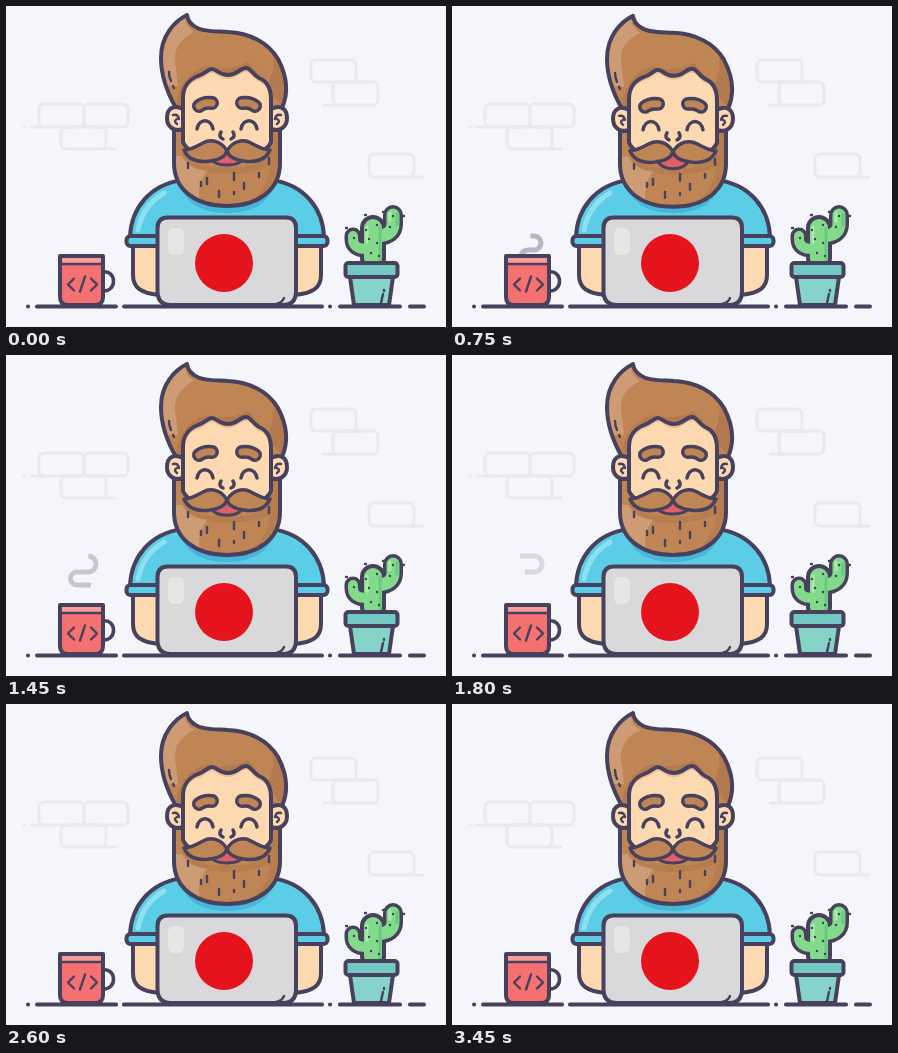
Recreate the animation shown at these times as an HTML page. Size 440x321 px, loop 3.5 s.

```html
<!DOCTYPE html>
<html lang="en">
<head>
<meta charset="utf-8">
<title>Bearded developer at a laptop</title>
<style>
  html, body { margin: 0; width: 100%; height: 100%; overflow: hidden; background: #f5f6fb; }
  svg { display: block; width: 440px; height: 321px; }
  .line { stroke: #47415d; stroke-width: 4; stroke-linecap: round; stroke-linejoin: round; }
  .thin { stroke-width: 2.4; }
  .open { fill: none; }
  .skin { fill: #fcd9b0; }
  .hair { fill: #bf8555; }
  .shade { fill: #a9714a; }
  .glow { fill: #cd9c74; }
  .shirt { fill: #5bcde6; }
  .green { fill: #83da8a; }
  .bricks { fill: none; stroke: #ebeaeb; stroke-width: 3; stroke-linecap: round; }
</style>
</head>
<body>
<svg viewBox="0 0 440 321">
  <defs>
    <path id="hairShape" d="M181 9C169 15 155 29 155 52C155 72 162 88 170 102H276C283 86 281 70 272 53C262 36 243 27 222 26C210 25 196 26 188 20Q182 16 181 9Z"/>
    <path id="face" d="M177 150V92C177 80 184 73 192 70C199 68 202 63 206 63C211 63 212 69 222 69C231 69 234 62 240 62C245 62 247 69 253 72C261 75 265 82 265 94V150Z"/>
    <path id="beardShape" d="M168 124V157C168 184 190 200 221 200C252 200 274 184 274 157V124H265V136Q260 147 243 148H199Q182 147 177 136V124Z"/>
    <path id="shirtShape" d="M124 231C125 203 143 179 176 174H266C299 179 317 203 318 231Z"/>
    <path id="mustache" d="M221 145C215 134 204 133 197 137C190 141 184 144 178 144C182 154 193 157 204 155C213 154 219 151 221 145Z"/>
    <clipPath id="hairClip"><use href="#hairShape"/></clipPath>
    <clipPath id="beardClip"><use href="#beardShape"/></clipPath>
    <clipPath id="shirtClip"><use href="#shirtShape"/></clipPath>
    <g id="ear">
      <path class="line skin" d="M177 103C167 98 161 103 161 112C161 121 168 126 177 123Z"/>
      <path class="line thin open" d="M167 109Q172 108 173 113M171 113Q167 115 171 118"/>
    </g>
    <g id="faceHalf">
      <path class="line open" d="M193 100Q198 96 206 97" style="stroke-width:14"/>
      <path d="M193 100Q198 96 206 97" fill="none" stroke="#bf8555" stroke-width="7" stroke-linecap="round"/>
      <path class="line open" d="M191 123C193 112 205 112 207 123" style="stroke-width:3.5"/>
      <path class="line open" d="M215 126Q212 131 217 133" style="stroke-width:3.5"/>
    </g>
    <g id="arm">
      <path class="line skin" d="M127 240V269C127 282 135 287 153 289V240Z"/>
      <rect class="line shirt" x="120.500" y="230" width="36" height="10" rx="4"/>
    </g>
  </defs>

  <g class="bricks">
    <rect x="33" y="98" width="45" height="23" rx="5"/>
    <rect x="78" y="98" width="44" height="23" rx="5"/>
    <rect x="55" y="121" width="45" height="22" rx="5"/>
    <rect x="305" y="54" width="45" height="22" rx="5"/>
    <rect x="327" y="76" width="45" height="23" rx="5"/>
    <rect x="363" y="148" width="45" height="23" rx="5"/>
    <path d="M18 121h.1M25 121H40M95 143H109M318 99H332M345 76H360M403 171H417"/>
  </g>

  <path class="line open" d="M22 300.500h.1M31 300.500H110M118 300.500H316M324 300.500h.1M334 300.500H394M404 300.500H418"/>

  <!-- Body -->
  <use href="#shirtShape" class="shirt"/>
  <g clip-path="url(#shirtClip)">
    <path d="M172 174Q180 207 221 207Q262 207 270 174Z" fill="#48b5da"/>
    <path d="M132 224Q137 199 158 187" fill="none" stroke="#8de0ef" stroke-width="5" stroke-linecap="round"/>
  </g>
  <use href="#shirtShape" class="line open"/>
  <use href="#arm"/>
  <use href="#arm" transform="translate(442) scale(-1 1)"/>

  <!-- Head -->
  <g id="head">
    <use href="#hairShape" class="hair"/>
    <g clip-path="url(#hairClip)">
      <path class="glow" d="M181 9Q176 18 188 26Q164 38 170 62L172 80H150V20Z"/>
      <path class="shade" opacity=".5" d="M260 30Q275 55 260 82L285 110V30ZM170 100Q172 70 200 60Q222 66 242 56L262 80V102Z"/>
    </g>
    <use href="#hairShape" class="line open"/>
    <path class="line open thin" d="M163 66Q163 71 165 75M167 80l1 2"/>
    <use href="#face" fill="#edbd94"/>
    <use href="#face" class="skin" y="4"/>
    <use href="#face" class="line open"/>
    <use href="#beardShape" class="hair"/>
    <g clip-path="url(#beardClip)">
      <path class="glow" d="M168 150H176Q184 165 202 164Q190 178 194 198H168Z"/>
      <path class="shade" opacity=".4" d="M177 136Q180 159 204 161H238Q260 159 265 136V124H276V200H235Q262 188 264 160Q245 168 221 168Q190 168 177 150Z"/>
    </g>
    <use href="#beardShape" class="line open"/>
    <path class="line open thin" d="M182 157v5M195 176v4M201 172v6M213 185v6M228 167v7M228 186v2M238 177v6M253 167v4M263 152v6"/>
    <use href="#ear"/>
    <use href="#ear" transform="translate(442) scale(-1 1)"/>
    <use href="#faceHalf"/>
    <use href="#faceHalf" transform="translate(442) scale(-1 1)"/>
    <path id="mouth" class="line" fill="#e0606a" style="stroke-width:3"/>
    <g class="line hair" style="stroke-width:3.5">
      <use href="#mustache"/>
      <use href="#mustache" transform="translate(442) scale(-1 1)"/>
    </g>
  </g>

  <!-- Laptop -->
  <path class="line" fill="#d9d9dc" d="M162 211.500H280Q290 211.500 290 222V285Q290 299 277 299H165Q151.500 299 151.500 285V222Q151.500 211.500 162 211.500Z"/>
  <rect x="162" y="222" width="16" height="27" rx="6" fill="#e6e6e9"/>
  <path class="line open thin" d="M270 298Q276 297 278 292"/>
  <circle cx="218" cy="257" r="29" fill="#e5141c"/>

  <!-- Mug -->
  <path id="steam" pathLength="118" fill="none" stroke="#b7b7c3" stroke-width="5" d="M69 252Q69 244 77 244H82A7 7 0 0 0 82 230H71A6.5 6.5 0 0 1 71 217H82A8 8 0 0 0 82 201H68"/>
  <path class="line open" d="M97 266C111 264 111 286 97 285" style="stroke-width:3.5"/>
  <path class="line" fill="#f57070" d="M54 250H97V291Q97 299 89 299H62Q54 299 54 291Z"/>
  <path d="M56 252H95V257H56Z" fill="#f99d9b"/>
  <path class="line open thin" d="M54 258H97M68 272.500l-6 6 6 6M85 272.500l6 6-6 6M79 270.500l-5 15"/>

  <!-- Cactus -->
  <g class="line open">
    <path d="M347 230V233Q347 243 360 243" style="stroke-width:17"/>
    <path d="M387 209V218Q387 229 372 230" style="stroke-width:20"/>
  </g>
  <rect class="line green" x="356" y="211" width="22" height="52" rx="11"/>
  <g fill="none" stroke="#83da8a" stroke-linecap="round">
    <path d="M347 230V233Q347 243 360 243" stroke-width="10"/>
    <path d="M387 209V218Q387 229 372 230" stroke-width="13"/>
    <path d="M374 222V256M391 208V219" stroke="#69c881" stroke-width="3"/>
    <path d="M361 221V236M384 207V215" stroke="#a9ecaa" stroke-width="3"/>
  </g>
  <path class="line open thin" d="M397 210h1M378 206h-1M341 222h-1M360 209h-1M360 224v.1M371 219v.1M363 233v.1M371 237v.1M365 247v.1M373 250v.1M387 210v.1M384 221v.1M348 232v.1"/>
  <path class="line" fill="#86d3ca" d="M344 271H387L383 299H348Z"/>
  <rect class="line" x="339.500" y="257" width="52" height="14" rx="3" fill="#74c8c3"/>
  <path class="line open thin" d="M375 297l2-9M378 284v1"/>
</svg>
<script>
  const LOOP = 3500, STEP = 50, STEAM = 118;
  const get = id => document.getElementById(id);
  const head = get("head"), mouth = get("mouth"), steam = get("steam");

  const clamp = (v, max = 1) => Math.min(max, Math.max(0, v));
  const ramp = (t, from, to) => {
    const p = clamp((t - from) / (to - from));
    return p * p * (3 - 2 * p);
  };

  function draw(t) {
    const nod = t < 1000 ? 1.7 * Math.sin(Math.PI * t / 1000) ** 2 : 0;
    head.setAttribute("transform", `translate(0 ${nod})`);

    const smile = ramp(t, 50, 400) - ramp(t, 1150, 1700);
    const lip = 161 + 4 * smile;
    mouth.setAttribute("d", `M205 153C210 ${lip} 232 ${lip} 237 153L221 146Z`);

    // The steam grows out of the mug, then its tail follows while it fades.
    const tip = clamp(0.088 * (t - 270), STEAM);
    const tail = clamp(0.1 * (t - 1092), STEAM);
    steam.style.visibility = tip > tail ? "visible" : "hidden";
    steam.setAttribute("stroke-dasharray", `0 ${tail} ${Math.max(0, tip - tail)} ${STEAM * 2}`);
    steam.setAttribute("opacity", 1 - 0.9 * clamp((t - 1150) / 1100));
  }

  function tick() {
    draw(Math.floor(performance.now() % LOOP / STEP) * STEP);
    requestAnimationFrame(tick);
  }
  tick();
</script>
</body>
</html>
```
